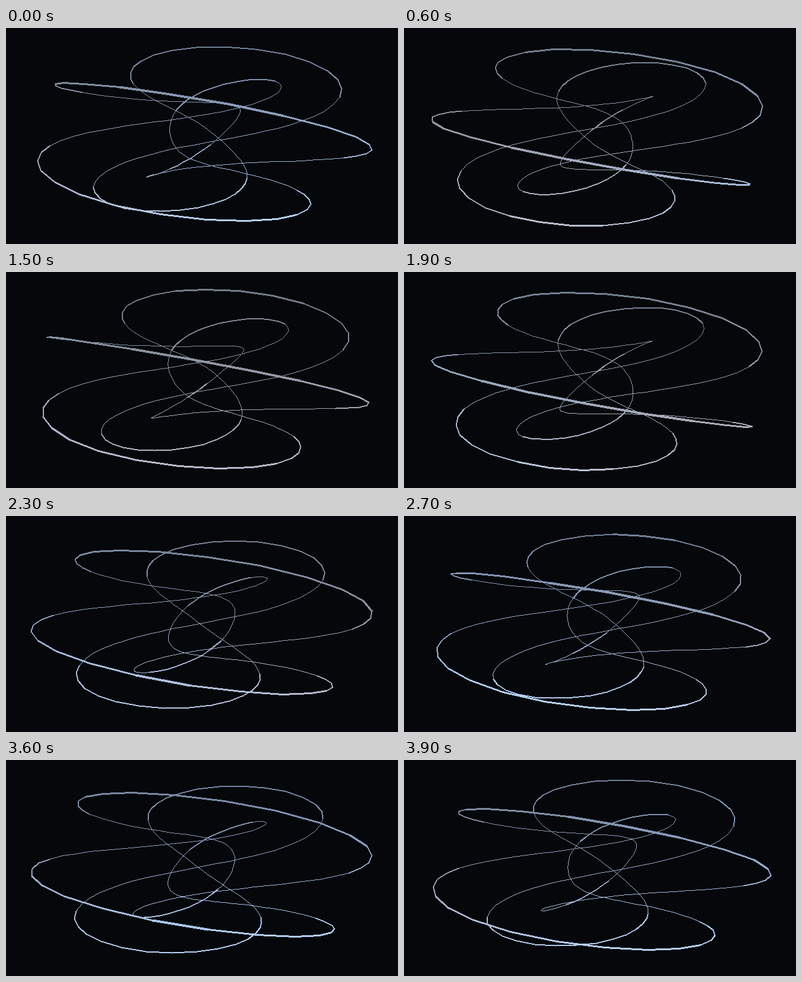
An HTML page with a canvas that plays this animation: 650 px wide and 360 px high, repeating every 4 s.

```html
<!DOCTYPE html>
<html lang="en">
<head>
<meta charset="utf-8">
<title>Rotating torus link</title>
<style>
  html, body { margin: 0; width: 100%; height: 100%; overflow: hidden; background: #05070b; }
  canvas { display: block; }
</style>
</head>
<body>
<canvas id="stage" width="650" height="360"></canvas>
<script>
const ctx = document.getElementById('stage').getContext('2d');
const W = 650, H = 360, TAU = Math.PI * 2;
const LOOP = 4000, STEP = 100;
const STRANDS = 3, SEGMENTS = 80, FIRST = 0.008;

// Lengths are in units of the camera distance.
const RING = 0.421, TUBE = 0.2526;
const FOCAL = H / 2 / Math.tan(Math.PI / 6);
const LINE = 1.25;

const GREY = [[112, 123, 136], [184, 184, 197]];
const BLUE = [[114, 128, 156], [182, 213, 255]];

const clamp = v => Math.min(1, Math.max(0, v));
const mix = (a, b, k) => a.map((v, i) => v + (b[i] - v) * k);

// Each strand winds twice around the vertical axis and once around the tube.
function project(u, turn) {
  const angle = 2 * u + turn;
  const radius = RING + TUBE * Math.cos(u);
  const depth = 1 - radius * Math.cos(angle);
  return {
    x: Math.floor(W / 2 + FOCAL * radius * Math.sin(angle) / depth),
    y: Math.floor(H / 2 + FOCAL * TUBE * Math.sin(u) / depth),
    depth
  };
}

// The blue tint travels across the stage from left to right.
function shade(x, y, phase) {
  const tint = 0.5 + 0.5 * Math.cos(TAU * (phase - 0.825) - (x - W / 2) / 285);
  const height = clamp((y - 30) / 290);
  const rgb = mix(mix(...GREY, height), mix(...BLUE, height), tint);
  return `rgb(${rgb.map(Math.round).join(',')})`;
}

// Hard-edged line, stepped along its longer axis.
function pixelLine(a, b, width) {
  const dx = b.x - a.x, dy = b.y - a.y;
  const steps = Math.max(Math.abs(dx), Math.abs(dy), 1);
  const steep = Math.abs(dy) > Math.abs(dx);
  const size = Math.max(1, Math.round(width * Math.hypot(dx, dy) / steps));
  const inset = (size - 1) / 2;
  for (let i = 0; i <= steps; i++) {
    const x = a.x + dx * i / steps, y = a.y + dy * i / steps;
    if (steep) ctx.fillRect(Math.round(x - inset), Math.round(y), size, 1);
    else ctx.fillRect(Math.round(x), Math.round(y - inset), 1, size);
  }
}

function draw(ms) {
  const phase = ms / LOOP;
  const segments = [];

  for (let s = 0; s < STRANDS; s++) {
    const turn = TAU * (1 / 12 - phase + s / STRANDS);
    let a = project(FIRST, turn);
    for (let i = 1; i <= SEGMENTS; i++) {
      const b = project(FIRST + TAU * i / SEGMENTS, turn);
      segments.push({ a, b, depth: (a.depth + b.depth) / 2 });
      a = b;
    }
  }
  segments.sort((p, q) => q.depth - p.depth);

  ctx.fillStyle = '#05070b';
  ctx.fillRect(0, 0, W, H);
  for (const { a, b, depth } of segments) {
    ctx.fillStyle = shade((a.x + b.x) / 2, (a.y + b.y) / 2, phase);
    pixelLine(a, b, Math.max(1, Math.round(LINE / depth)));
  }
}

const start = performance.now();
let shown = -1;
function tick() {
  const ms = Math.floor((performance.now() - start) % LOOP / STEP) * STEP;
  if (ms !== shown) draw(shown = ms);
  requestAnimationFrame(tick);
}
tick();
</script>
</body>
</html>
```
